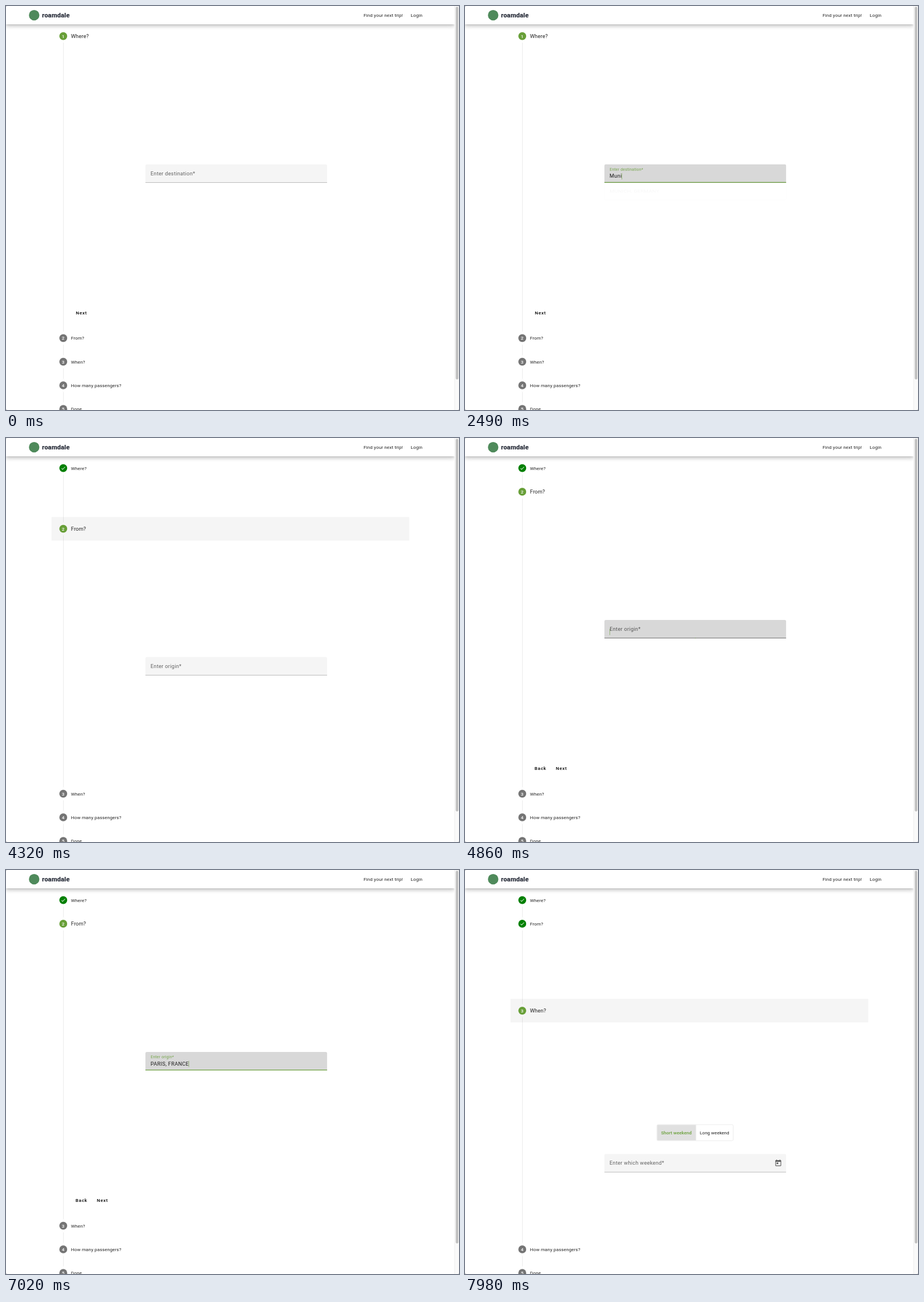
These frames come from a looping animation (793x706 px, 8000 ms). An HTML page:

```html
<!DOCTYPE html>
<html lang="en">
<head>
<meta charset="utf-8">
<title>Trip planner</title>
<style>
  html, body { margin: 0; width: 100%; height: 100%; overflow: hidden; background: #c4c4c4; }
  body { position: relative; }
  .clip { position: absolute; inset: 0; overflow: hidden; border-radius: 3px; background: #fff; }
  .stage {
    position: absolute; left: 0; top: 0; width: 1384px; height: 1233px;
    transform: scale(.573); transform-origin: 0 0;
    font: 400 14px Roboto, sans-serif; letter-spacing: .0179em; color: rgba(0,0,0,.87);
    --green: #689f38;
  }
  .stage * { box-sizing: border-box; white-space: pre; }
  .page { position: absolute; left: 0; top: 0; width: 1370px; height: 1233px; overflow: hidden; }
  .bar {
    position: absolute; left: 0; top: 0; width: 1370px; height: 56px; line-height: 56px; background: #fff; z-index: 2;
    box-shadow: 0 3px 5px -1px rgba(0,0,0,.2), 0 6px 10px rgba(0,0,0,.14), 0 1px 18px rgba(0,0,0,.12);
  }
  .bar > * { position: absolute; top: 0; }
  .mark { left: 70px; top: 12px !important; width: 32px; height: 32px; border-radius: 50%; background: #4f8a5b; }
  .brand { left: 110px; font-size: 20px; font-weight: 900; letter-spacing: 0; color: #2d323e; }
  .scroll { position: absolute; left: 1370px; top: 0; width: 14px; height: 1233px; background: #fafafa; border-left: 1px solid #e4e4e4; }
  .scroll i { position: absolute; left: 3px; top: 2px; width: 8px; height: 1137px; border-radius: 4px; background: #c1c1c1; }

  .stepper { position: absolute; left: 138.6px; top: 56px; width: 1093px; }
  .head { height: 72px; padding-left: 24px; display: flex; align-items: center; }
  .head.focus { background: rgba(0,0,0,.04); }
  .dot {
    width: 24px; height: 24px; margin-right: 12px; border-radius: 50%; background: #757575; color: #fff;
    display: flex; align-items: center; justify-content: center; letter-spacing: 0; font-weight: 500;
  }
  .dot svg { display: none; width: 16px; height: 16px; fill: #fff; }
  .active .dot { background: var(--green); }
  .active .name { font-size: 16px; }
  .done .dot { background: green; }
  .done .dot svg { display: block; }
  .done .dot b { display: none; }
  .dot b { font-weight: inherit; }
  .body { position: relative; }
  .body::before { content: ""; position: absolute; left: 36px; top: -16px; bottom: -16px; width: 1px; background: rgba(0,0,0,.14); }
  .content { position: relative; margin-left: 60px; width: 1033px; height: 0; overflow: hidden; }

  .field {
    position: absolute; left: 227px; top: 355px; width: 555px; height: 56px;
    border-radius: 4px 4px 0 0; background: #f5f5f5; font-size: 16px; letter-spacing: .03125em;
  }
  .field.low { top: 401px; }
  .label {
    position: absolute; left: 16px; top: 28px; line-height: 18.4px; color: rgba(0,0,0,.6);
    transform: translateY(-50%); transform-origin: 0 0;
  }
  .value { position: absolute; left: 16px; top: 24px; height: 24px; line-height: 24px; }
  .value.caret::after { content: ""; position: absolute; left: 100%; top: 3px; width: 1px; height: 19px; background: var(--green); }
  .line, .glow { position: absolute; left: 0; right: 0; bottom: 0; height: 1px; background: rgba(0,0,0,.42); }
  .glow { height: 2px; background: var(--green); transform: scaleX(0); }
  .panel {
    position: absolute; left: 0; top: 56px; width: 100%; padding: 8px 0; background: #fff;
    border-radius: 0 0 4px 4px; transform-origin: 50% 0; opacity: 0; z-index: 1;
    box-shadow: 0 2px 4px -1px rgba(0,0,0,.2), 0 4px 5px rgba(0,0,0,.14), 0 1px 10px rgba(0,0,0,.12);
  }
  .panel div { height: 48px; line-height: 48px; padding-left: 16px; }
  .today { position: absolute; right: 12px; top: 16px; width: 24px; height: 24px; fill: rgba(0,0,0,.6); }

  .actions { position: absolute; left: 0; top: 789px; display: flex; }
  .btn {
    position: relative; width: 64px; height: 36px; line-height: 36px; border-radius: 4px; overflow: hidden;
    text-align: center; font-weight: 500; letter-spacing: .0892em; color: #000;
  }
  .btn i { position: absolute; left: -6px; top: -20px; width: 76px; height: 76px; border-radius: 50%; background: #000; opacity: 0; }
  .toggle {
    position: absolute; top: 311px; left: 504.5px; transform: translateX(-50%); display: flex; height: 50px; line-height: 48px;
    border: 1px solid #dedede; border-radius: 4px; overflow: hidden; letter-spacing: 0;
  }
  .toggle span { padding: 0 12px; }
  .toggle .on { background: #e0e0e0; color: var(--green); font-weight: 500; }
  .toggle span + span { border-left: 1px solid #dedede; }
</style>
</head>
<body>
<div class="clip"><div class="stage">
  <div class="page">
    <div class="bar">
      <span class="mark"></span><span class="brand">roamdale</span>
      <span style="left:1092.5px">Find your next trip!</span><span style="left:1236.5px">Login</span>
    </div>
    <div class="stepper"></div>
  </div>
  <div class="scroll"><i></i></div>
</div></div>
<script>
const LOOP = 8000, FULL = 849, SLIDE = 840;
const CLICKS = [3827, 7563];       // step changes
const HEAD_BLUR = 4835;            // second header loses focus

const fields = [
  { hover: 510, focus: 890, open: 2490, pick: 2990, leave: 3745,
    typed: [[1440, "M"], [1620, "Mu"], [1650, "Mun"], [1800, "Muni"], [3020, "MUNICH, GERMANY"]],
    blink: [[1800, 1950], [2500, 3000], [3655, 3745]] },
  { hover: 4700, focus: 4855, open: 6410, pick: 6845, leave: 7465,
    typed: [[5370, "P"], [5580, "Pa"], [5730, "Par"], [5850, "Pari"], [5940, "Paris"], [6875, "PARIS, FRANCE"]],
    blink: [[6430, 6715]] }
];

const field = (label, options, extra = "", cls = "") => `<div class="field ${cls}"><span class="label">${label}*</span>` +
  `<span class="value"></span><i class="line"></i><i class="glow"></i>${extra}` +
  (options.length ? `<div class="panel">${options.map(o => `<div>${o}</div>`).join("")}</div>` : "") + `</div>`;
const actions = (...names) => `<div class="actions">${names.map(n => `<div class="btn ${n}">${n}<i></i></div>`).join("")}</div>`;
const today = `<svg class="today" viewBox="0 0 24 24"><path d="M19 3h-1V1h-2v2H8V1H6v2H5c-1.1 0-2 .9-2 2v14c0 1.1.9 2 2 2h14c1.1 0 2-.9 2-2V5c0-1.1-.9-2-2-2zm0 16H5V8h14v11zM7 10h5v5H7z"/></svg>`;
const check = `<svg viewBox="0 0 24 24"><path d="M9 16.2 4.8 12l-1.4 1.4L9 19 21 7l-1.4-1.4z"/></svg>`;

const steps = [
  ["Where?", field("Enter destination", ["MUNICH, GERMANY"]) + actions("Next")],
  ["From?", field("Enter origin", ["PARIS, FRANCE", "PARIS, UNITED STATES"]) + actions("Back", "Next")],
  ["When?", `<div class="toggle"><span class="on">Short weekend</span><span>Long weekend</span></div>` +
    field("Enter which weekend", [], today, "low") + actions("Back", "Next")],
  ["How many passengers?", ""],
  ["Done", ""]
];
document.querySelector(".stepper").innerHTML = steps.map(([name, html], i) =>
  `<div class="head"><span class="dot"><b>${i + 1}</b>${check}</span><span class="name">${name}</span></div>` +
  `<div class="body"><div class="content">${html}</div></div>`).join("");

const all = s => [...document.querySelectorAll(s)];
const heads = all(".head"), contents = all(".content"), buttons = all(".Next");
fields.forEach((f, i) => {
  for (const part of ["field", "label", "value", "line", "glow", "panel"])
    f[part] = contents[i].querySelector("." + part);
});

const seg = (t, start, length) => Math.min(1, Math.max(0, (t - start) / length));
const bezier = (x1, y1, x2, y2) => x => {
  const at = (a, b, s) => 3 * (1 - s) * (1 - s) * s * a + 3 * (1 - s) * s * s * b + s * s * s;
  if (x <= 0 || x >= 1) return x <= 0 ? 0 : 1;
  let lo = 0, hi = 1;
  for (let i = 0; i < 24; i++) {
    const mid = (lo + hi) / 2;
    if (at(x1, x2, mid) < x) lo = mid; else hi = mid;
  }
  return at(y1, y2, lo);
};
const ease = bezier(.4, 0, .2, 1), decel = bezier(0, 0, .2, 1);

function drawField(f, t) {
  const back = f.pick + 30;
  const focused = t >= f.focus && t < f.pick || t >= back && t < f.leave;
  const hovered = t >= f.hover && t < f.pick;
  const shade = Math.round(245 * (1 - (focused ? .12 : hovered ? .04 : 0)));
  f.field.style.backgroundColor = `rgb(${shade},${shade},${shade})`;
  f.line.style.backgroundColor = `rgba(0,0,0,${hovered ? .87 : .42})`;

  const up = ease(seg(t, f.focus, 150));
  f.label.style.transform = `translateY(${-50 - 56 * up}%) scale(${1 - .25 * up})`;
  f.label.style.color = focused && up > .1 ? "rgba(104,159,56,.87)" : "rgba(0,0,0,.6)";

  const grow = t < f.pick ? seg(t, f.focus, 180) : seg(t, back, 140);
  f.glow.style.transform = `scaleX(${ease(grow)})`;
  f.glow.style.opacity = focused ? 1 : t >= f.leave ? 1 - seg(t, f.leave, 180) : 0;

  f.value.textContent = f.typed.reduce((text, [at, next]) => t >= at ? next : text, "");
  f.value.classList.toggle("caret", focused && !f.blink.some(([a, b]) => t >= a && t < b));

  const shown = seg(t, f.open, 120);
  f.panel.style.opacity = decel(shown) * (1 - seg(t, back, 100));
  f.panel.style.transform = `scaleY(${.8 + .2 * decel(shown)})`;
}

function drawButton(button, t, press, hover) {
  const ripple = button.lastChild.style;
  button.style.backgroundColor = t >= hover && t < press + 600 ? "rgba(0,0,0,.04)" : "transparent";
  ripple.transform = `scale(${decel(seg(t, press, 225))})`;
  ripple.opacity = t < press ? 0 : .1 * (1 - seg(t, press + 225, 150));
}

function render(t) {
  const [a, b] = CLICKS.map(c => ease(seg(t, c, SLIDE)));
  [1 - a, a - b, b].forEach((part, i) => contents[i].style.height = FULL * part + "px");

  const active = CLICKS.filter(c => t >= c).length;
  heads.forEach((head, i) => {
    head.classList.toggle("active", i === active);
    head.classList.toggle("done", i < active);
    head.classList.toggle("focus", i === active && (i === 2 || i === 1 && t < HEAD_BLUR));
  });
  fields.forEach(f => drawField(f, t));
  drawButton(buttons[0], t, fields[0].leave, 3640);
  drawButton(buttons[1], t, fields[1].leave, 7400);
}

const start = performance.now();
function tick() {
  render((performance.now() - start) % LOOP);
  requestAnimationFrame(tick);
}
tick();
</script>
</body>
</html>
```
